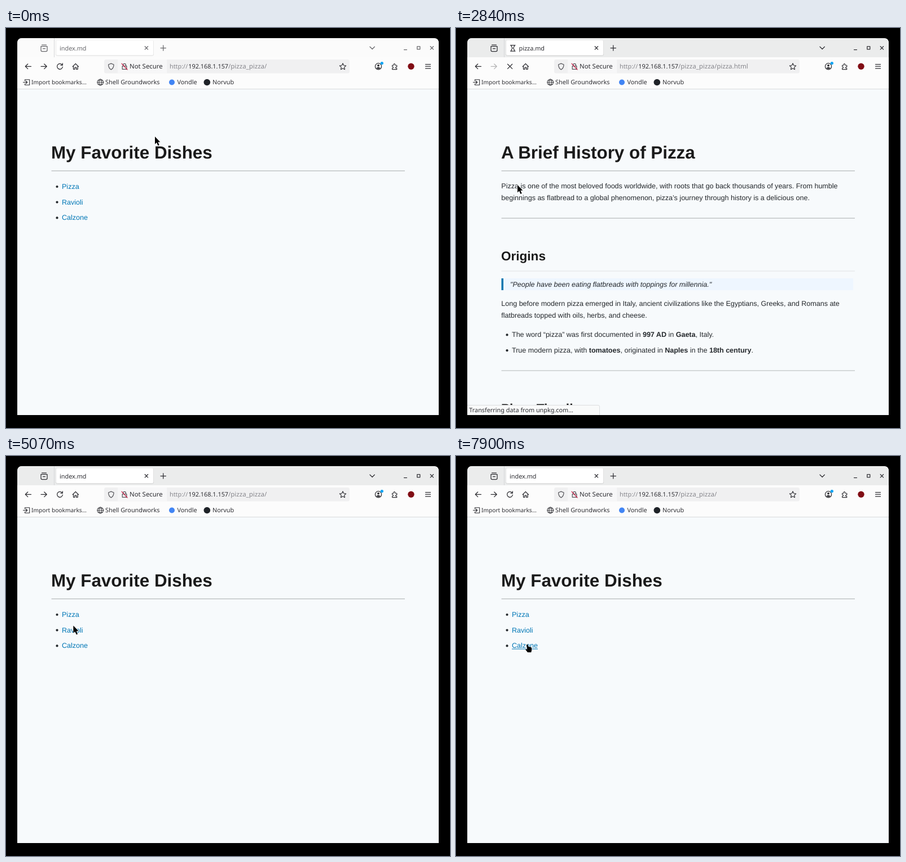
An HTML page for the animation above (8000 ms loop, 787 by 711 pixels).

```html
<!DOCTYPE html>
<html lang="en">
<head>
<meta charset="utf-8">
<title>Recipe site</title>
<style>
  html, body { margin: 0; width: 100%; height: 100%; overflow: hidden; background: #000; }
  svg { display: block; width: 787px; height: 711px; }
  text { white-space: pre; text-rendering: geometricPrecision; }
  .page text { font-family: "Liberation Sans", Arial, sans-serif; font-size: 12.54px; fill: #24282c; }
  .page .h1 { font-size: 31.35px; font-weight: bold; fill: #1a1a1a; }
  .page .h2 { font-size: 22.55px; font-weight: bold; fill: #1a1a1a; }
  .page .quote { font-style: italic; }
  .page .link { fill: #0077b6; }
  .b { font-weight: bold; }
  .ui text { font-family: "Noto Sans", sans-serif; font-size: 10.85px; fill: #2e2e33; }
  .ui .dim { fill: #86868c; }
  .ico { fill: none; stroke: #2e2e33; stroke-width: 1.25; stroke-linecap: round; stroke-linejoin: round; }
</style>
</head>
<body>
<svg viewBox="0 0 787 711">
  <defs>
    <clipPath id="frame"><path d="M20 688V27q0-9 9-9H758q9 0 9 9V688z"/></clipPath>
  </defs>
  <rect width="787" height="711"/>
  <g clip-path="url(#frame)">
    <rect x="20" y="18" width="747" height="670" fill="#f7fafc"/>
    <g id="pages" class="page"></g>
    <rect id="scroll" x="763.5" y="111" width="2.5" rx="1" fill="#6b6d70"/>

    <g class="ui">
      <rect id="titlebar" x="20" y="18" width="747" height="35"/>
      <rect x="20" y="52" width="747" height="56.5" fill="#fcfcfc"/>
      <path d="M20 108.5H767" stroke="#d9dadc"/>
      <g id="title">
        <path d="M85.5 18V52" stroke="#d5d6d8"/>
        <rect x="88" y="21.5" width="174" height="28" rx="3.5" fill="#000" opacity=".13"/>
        <rect x="88.6" y="21.6" width="172.8" height="27" rx="3.2" fill="#fff"/>
        <g id="titleInk">
          <g class="ico">
            <path d="M63.5 30H71.5M62 32.7H73V39.5q0 2-2 2H64q-2 0-2-2zM65.5 36.7H69.5"/>
            <path d="M246.2 32.7l5.4 5.4m0-5.4l-5.4 5.4M274 35.5h9.4m-4.7-4.7v9.4M645 33.3l4.2 4.2 4.2-4.2"/>
            <path d="M705.5 38.5h5M728.8 32.8h5v5h-5zM752.2 32.7l5.4 5.4m0-5.4l-5.4 5.4"/>
          </g>
          <path id="glass" class="ico" stroke-width="1" d="M96.5 30.5h8.5M96.5 41h8.5M97.8 30.5c0 3 2 4 2 5.2s-2 2.3-2 5.3M103.7 30.5c0 3-2 4-2 5.2s2 2.3 2 5.3"/>
          <text id="tab" y="39.6"></text>
        </g>
      </g>

      <rect id="backBg" x="27" y="56" width="24" height="25" rx="3"/>
      <g class="ico">
        <path d="M44.5 68.3H34.5M38.7 64L34.3 68.3 38.7 72.6"/>
        <path id="forward" d="M62 68.3H72M67.8 64L72.2 68.3 67.8 72.6"/>
        <path id="reload" d="M99.6 65.6A4.9 4.9 0 1 0 100.4 69M100.3 62.8V66.2H96.9"/>
        <path id="stop" d="M91.5 64.2l8.2 8.2m0-8.2l-8.2 8.2"/>
        <path d="M118 68.6L123.3 63.5 128.6 68.6M119.5 67.5V73.3H122V70H124.6V73.3H127.1V67.5"/>
      </g>
      <rect x="174" y="56" width="435" height="24.5" rx="3.5" fill="#f0f0f1"/>
      <rect x="198" y="56" width="87" height="24.5" fill="#f7f7f8"/>
      <g class="ico">
        <path d="M186.3 63.2L191 65C191 69.6 189.5 72.3 186.3 74 183.1 72.3 181.6 69.6 181.6 65z" stroke="#55555a"/>
        <path d="M206.2 67.6h7.6v5.7h-7.6zM207.6 67.4V65.8a2.4 2.4 0 0 1 4.8 0V67.4" stroke="#55555a"/>
        <path d="M205 63.2L215 74" stroke="#d0204a"/>
        <path d="M597 62.8l1.7 3.7 4 .5-3 2.7.8 4-3.5-2-3.5 2 .8-4-3-2.7 4-.5z" stroke-width="1.1"/>
        <path id="reader" d="M570.7 63.3h8v10.5h-8zM572.6 66h4.2m-4.2 2.5h4.2M572.6 71h2.5" stroke-width="1.1"/>
        <circle cx="660" cy="68.3" r="5.6"/>
        <path d="M684.6 66.2h2.4c-.6-3.4 3.4-3.4 2.8 0h3v3c-3-.6-3 3.2 0 2.6v1.8h-8.2v-2.2c2.6.2 2.6-2.8 0-2.6z" stroke-width="1.1"/>
        <path d="M743.5 64.5h9M743.5 68.2h9M743.5 71.9h9"/>
        <path d="M33.5 94V91.8h8.2v9.4h-8.2V99M30.5 96.5h7M35.2 94l2.5 2.5-2.5 2.5" stroke-width="1.1"/>
        <path d="M161.8 96.5h11M162.8 93.2h9M162.8 99.8h9" stroke-width=".9"/>
        <circle cx="167.3" cy="96.5" r="5.4" stroke-width="1"/>
        <ellipse cx="167.3" cy="96.5" rx="2.4" ry="5.4" stroke-width=".9"/>
      </g>
      <circle cx="660" cy="66.7" r="1.9" fill="#2e2e33"/>
      <path d="M656.4 71.2q3.6-3.4 7.2 0-3.6 3-7.2 0z" fill="#2e2e33"/>
      <circle cx="666.3" cy="62.6" r="2.7" fill="#12a5f4"/>
      <circle cx="718" cy="68.3" r="5.7" fill="#800d14"/>
      <circle cx="294" cy="96.5" r="5" fill="#4285f4"/>
      <circle cx="356.3" cy="96.5" r="5.8" fill="#1f2328"/>

      <text x="219" y="72.3" font-size="11.4" style="font-size:11.4px">Not Secure</text>
      <text x="290" y="72.3" class="dim">http://</text>
      <text x="323.3" y="72.3">192.168.1.157</text>
      <text id="path" x="394" y="72.3" class="dim" style="font-size:11.5px"></text>
      <text x="45" y="100.4" style="font-size:10.2px">Import bookmarks…</text>
      <text x="176" y="100.4">Shell Groundworks</text>
      <text x="303.5" y="100.4">Vondle</text>
      <text x="366" y="100.4">Norvub</text>

      <g id="status">
        <path d="M19 670.5H252q2.5 0 2.5 2.5V689H19z" fill="#f9fafa" stroke="#dcdee0"/>
        <text id="statusText" x="23.3" y="683.4"></text>
      </g>
    </g>
  </g>
  <g id="cursor" stroke="#fff" stroke-width="1" stroke-linejoin="round" paint-order="stroke">
    <path id="arrow" d="M0 0V13.4L3 10.6 5.4 16 7.7 15 5.3 9.8H9.3z"/>
    <path id="hand" d="M0 .8Q1.4-.8 2.6.8L3.4 4 7 4.6Q9.2 5 9.2 7V10L8.2 14H2L-1.6 9.6Q-2 7.6 0 8.2L1.2 9z"/>
  </g>
</svg>
<script>
const $ = id => document.getElementById(id);
const LOOP = 8000;

// Page content
const text = (x, y, s, cls = '') =>
  `<text x="${x}" y="${y}" class="${cls}">${s.replace(/\*(.+?)\*/g, '<tspan class="b">$1</tspan>')}</text>`;
const rule = y => `<path d="M80.5 ${y}H707" stroke="#c9ccce" stroke-width="1.7"/>`;
const bullet = (y, s, cls) => `<circle cx="90.5" cy="${y - 4}" r="2.1" fill="#24282c"/>` + text(99, y, s, cls);
const heading = s => text(80, 232.3, s, 'h1') + rule(253.8);

function article(a) {
  return heading(a.title)
    + text(80.3, 285.4, a.intro[0]) + text(80.3, 306.4, a.intro[1]) + rule(338.2)
    + text(80, 412.9, a.section, 'h2')
    + '<path d="M80.5 432H707" stroke="#dfe2e4"/>'
    + '<rect x="80.5" y="445" width="623.5" height="21" fill="#eef6ff"/>'
    + '<rect x="80.5" y="445" width="3.5" height="21" fill="#0077b0"/>'
    + text(96, 459.6, a.quote, 'quote')
    + text(80.3, 493.6, a.body[0]) + text(80.3, 514.6, a.body[1])
    + a.items.map((s, i) => bullet(549.4 + 27.8 * i, s)).join('')
    + rule(553.4 + 27.8 * a.items.length)
    + (a.next ? text(80, 683.8, a.next, 'h2') : '');
}

const links = [
  { name: 'Pizza', y: 286, right: 130 },
  { name: 'Ravioli', y: 313.6, right: 137 },
  { name: 'Calzone', y: 341.4, right: 145 },
];

const pages = {
  index: heading('My Favorite Dishes') + links.map(l => bullet(l.y, l.name, 'link')).join('')
    + links.map((l, i) => `<path id="line${i}" d="M99 ${l.y + 1.6}H${l.right}" stroke="#0077b6"/>`).join(''),
  pizza: article({
    title: 'A Brief History of Pizza',
    intro: ['Pizza is one of the most beloved foods worldwide, with roots that go back thousands of years. From humble',
      'beginnings as flatbread to a global phenomenon, pizza’s journey through history is a delicious one.'],
    section: 'Origins',
    quote: '"People have been eating flatbreads with toppings for millennia."',
    body: ['Long before modern pizza emerged in Italy, ancient civilizations like the Egyptians, Greeks, and Romans ate',
      'flatbreads topped with oils, herbs, and cheese.'],
    items: ['The word “pizza” was first documented in *997 AD* in *Gaeta*, Italy.',
      'True modern pizza, with *tomatoes*, originated in *Naples* in the *18th century*.'],
    next: 'Pizza Timeline',
  }),
  ravioli: article({
    title: 'The Rich History of Ravioli',
    intro: ['Ravioli are small pillows of pasta filled with delicious surprises — meat, cheese, vegetables, or even sweets.',
      'Beloved across Italy and around the world, ravioli have a long, flavorful history dating back centuries.'],
    section: 'Origins of Ravioli',
    quote: '“Ravioli is proof that good things come in small, pasta-wrapped packages.”',
    body: ['Ravioli likely originated in *Northern Italy* during the *Middle Ages*, although some food historians trace similar',
      'dishes even further back.'],
    items: ['Mentioned in *14th-century Italian manuscripts*', 'Originally handmade and filled with local ingredients',
      'Served in broth before tomato sauce became popular'],
  }),
};
$('pages').innerHTML = Object.entries(pages).map(([k, s]) => `<g id="${k}">${s}</g>`).join('');

// Visits: shown from "at"; loading ends at "done", tab title settles at "settled"
const visits = [
  { page: 'index', at: 0 },
  { page: 'pizza', at: 2760, read: 3090, done: 3270, settled: 3570, bar: 115, reader: 3730 },
  { page: 'index', at: 4530 },
  { page: 'ravioli', at: 5400, read: 5480, done: 5720, settled: 5900, bar: 105, reader: Infinity },
  { page: 'index', at: 7100 },
];

// Pointer stops: time, x, y
const stops = [
  [170, 264, 193], [330, 261, 196.5], [500, 261, 196.5], [860, 394, 65], [1280, 156, 221],
  [1370, 156, 221], [1640, 72, 262], [1920, 109, 279], [3690, 109, 279], [4440, 32, 65],
  [4570, 32, 65], [5150, 124, 314], [5740, 124, 314], [6150, 143, 101], [6350, 37, 65],
  [7110, 37, 65], [7740, 125, 350], [7800, 125, 350], [7890, 125, 335],
];
const clamp = v => Math.min(1, Math.max(0, v));
const ease = u => u * u * (3 - 2 * u);

function pointer(t) {
  let i = stops.findIndex(s => s[0] > t);
  if (i < 0) return stops[stops.length - 1].slice(1);
  if (!i) return stops[0].slice(1);
  const [t0, x0, y0] = stops[i - 1], [t1, x1, y1] = stops[i];
  const u = ease((t - t0) / (t1 - t0));
  return [x0 + (x1 - x0) * u, y0 + (y1 - y0) * u];
}

const show = (id, on) => $(id).setAttribute('visibility', on ? 'visible' : 'hidden');

function draw(t) {
  const v = visits.filter(p => p.at <= t).pop();
  const home = v.page === 'index';
  const loading = !home && t < v.done;
  const focused = t >= 2610;
  const [x, y] = pointer(t);

  for (const k in pages) $(k).style.display = k === v.page ? '' : 'none';
  $('titlebar').setAttribute('fill', focused ? '#ebecec' : '#fbfbfb');
  $('titleInk').setAttribute('opacity', focused ? 1 : 0.72);
  $('tab').textContent = v.page + '.md';
  $('tab').setAttribute('x', home || t >= v.settled ? 95 : 111.5);
  $('path').textContent = '/pizza_pizza/' + (home ? '' : v.page + '.html');
  $('forward').setAttribute('opacity', home ? 1 : 0.35);
  show('glass', loading);
  show('stop', loading);
  show('reload', !loading);
  show('reader', !home && t >= v.reader);
  show('status', loading);
  $('statusText').textContent = loading ? (t < v.read ? 'Transferring data from' : 'Read') + ' unpkg.com' + (t < v.read ? '…' : '') : '';

  show('scroll', !home && !loading);
  $('scroll').setAttribute('height', v.bar || 0);
  $('scroll').setAttribute('opacity', home ? 0 : clamp(0.1 + (t - v.done) / 330));

  const overBack = x >= 27 && x <= 51 && y >= 56 && y <= 81;
  const pressed = t >= 7020 && t < 7100;
  $('backBg').setAttribute('fill', pressed ? '#c0c0c1' : '#dcdcdd');
  show('backBg', overBack);

  let hand = false;
  links.forEach((l, i) => {
    const over = home && t >= 2240 && x >= 99 && x <= l.right && y >= l.y - 12 && y <= l.y + 3;
    $('line' + i).style.display = over ? '' : 'none';
    hand = hand || over;
  });
  show('hand', hand);
  show('arrow', !hand);
  $('cursor').setAttribute('transform', `translate(${x.toFixed(2)} ${y.toFixed(2)})`);
}

const start = performance.now();
function tick() {
  draw((performance.now() - start) % LOOP);
  requestAnimationFrame(tick);
}
tick();
</script>
</body>
</html>
```
